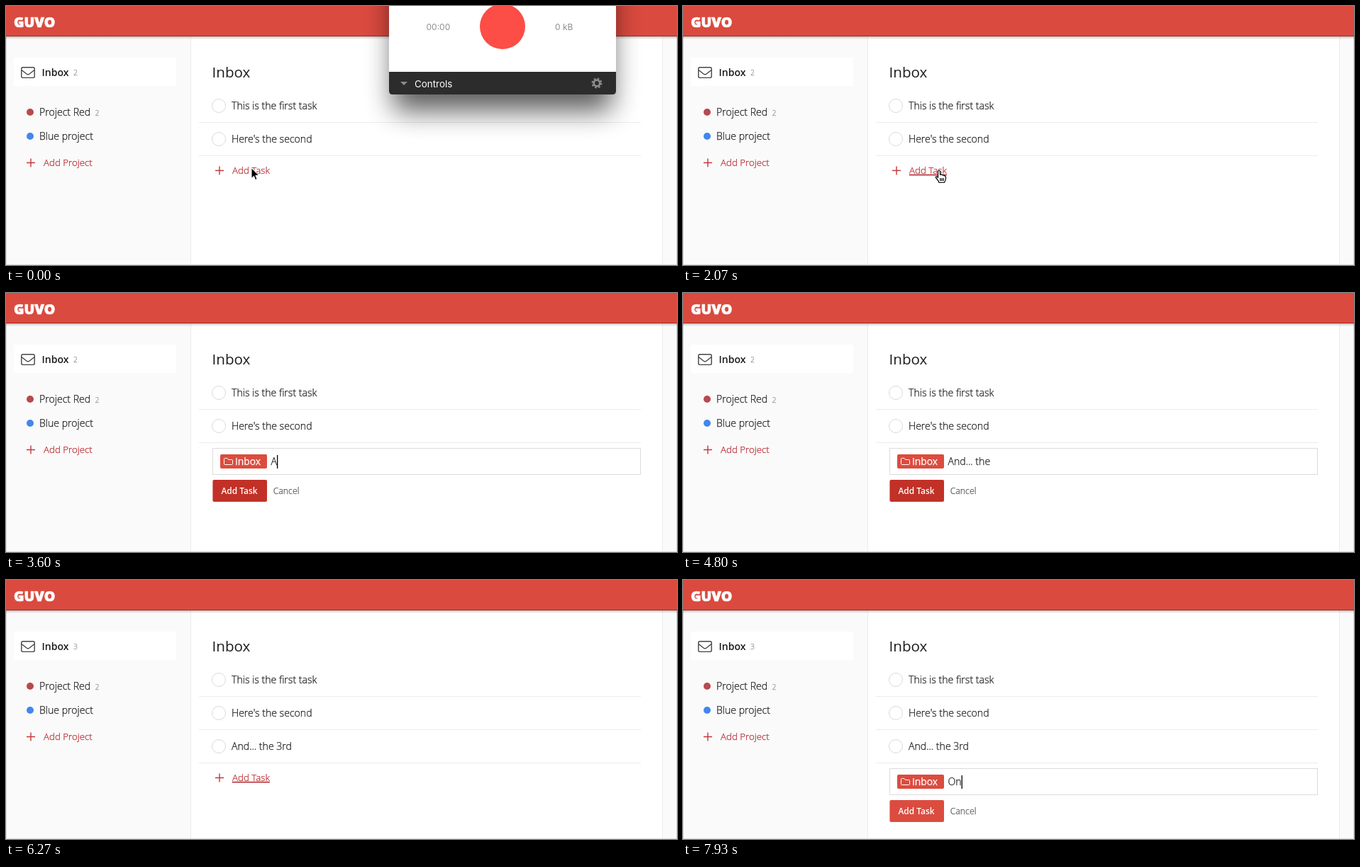
Animation of 946x366 px, one loop 8 s. Source, as an HTML page:

```html
<!DOCTYPE html>
<html lang="en">
<head>
<meta charset="utf-8">
<title>Task list</title>
<style>
  html, body { margin: 0; width: 100%; height: 100%; overflow: hidden; background: #fff; }
  svg { display: block; width: 946px; height: 366px; }
  text {
    font: 300 14.1px "Open Sans", sans-serif; white-space: pre;
    color: #1c1c1c; fill: currentColor; stroke: currentColor; stroke-width: .25;
  }
  .logo { font: 800 19.6px "Open Sans", sans-serif; color: #fff; stroke-width: .7; }
  .title { font-size: 20.6px; font-weight: 400; stroke-width: 0; }
  .strong { font-weight: 600; stroke-width: 0; }
  .count { font-size: 10.5px; color: #999; }
  .link { font-size: 13.3px; color: #b92e34; }
  .button { font-size: 11.9px; font-weight: 600; color: #fff; stroke-width: 0; }
  .cancel { font-size: 12.3px; color: #555; }
  .chip { font-size: 13.8px; font-weight: 400; color: #fff; }
  .meter { font: 400 12px Inter, sans-serif; color: #8e8e8e; stroke-width: 0; }
  .controls { font: 400 13.4px Inter, sans-serif; color: #fff; stroke-width: 0; }
  .line { fill: none; stroke: #ececec; }
  .plus { fill: none; stroke: #c5383a; stroke-width: 1.4; }
  .cursor { stroke-linejoin: round; stroke-linecap: round; }
</style>
</head>
<body>
<svg viewBox="0 0 946 366">
  <defs>
    <linearGradient id="drop" x2="0" y2="1">
      <stop stop-color="#000" stop-opacity=".22"/>
      <stop offset="1" stop-color="#000" stop-opacity="0"/>
    </linearGradient>
    <filter id="soft" x="-30%" y="-60%" width="160%" height="220%">
      <feGaussianBlur stdDeviation="19"/>
    </filter>
    <path id="plus" class="plus" d="M-6 0H6M0-6V6"/>
  </defs>

  <rect width="946" height="366" fill="#fafafa"/>
  <rect x="261" y="43" width="664" height="323" fill="#fff"/>
  <path class="line" d="M260.5 43V366M925.5 43V366"/>
  <path d="M.5 43V365.5H945.5V43" fill="none" stroke="#dedede"/>
  <rect width="946" height="42" fill="#da4a3f"/>
  <rect y="42" width="946" height="1" fill="#a52b22"/>
  <rect y="43" width="946" height="4" fill="url(#drop)"/>
  <text class="logo" x="11" y="30">GUVO</text>

  <rect x="11" y="73" width="229" height="40" fill="#fff"/>
  <g fill="none" stroke="#444" stroke-width="1.4">
    <rect x="21.8" y="86.8" width="18.4" height="14.6" rx="1.8"/>
    <path d="M22 90.5L29 96Q31 97.5 33 96L40 90.5"/>
  </g>
  <text class="strong" x="50.5" y="99">Inbox</text>
  <text class="count" x="95" y="98" id="count"></text>
  <circle cx="34" cy="150" r="5" fill="#b8494d"/>
  <text x="47" y="155">Project Red</text>
  <text class="count" x="125.5" y="155">2</text>
  <circle cx="34" cy="184" r="5" fill="#4386ee"/>
  <text x="47" y="189">Blue project</text>
  <use href="#plus" x="35" y="221.5"/>
  <text class="link" x="53" y="226">Add Project</text>

  <text class="title" x="290.5" y="101">Inbox</text>
  <g id="tasks"></g>

  <g id="addLink">
    <use href="#plus" x="301" y="232.5"/>
    <text class="link" x="319" y="237" id="addText">Add Task</text>
  </g>

  <g id="form">
    <rect x="291.5" y="219.5" width="603" height="37" fill="#fff" stroke="#dcdcdc"/>
    <rect x="302" y="228" width="66" height="20" rx="2" fill="#db4c3f"/>
    <path d="M307.5 241.5V234.5Q307.5 233.5 308.5 233.5H312L313.5 235.5H318.5Q319.5 235.5 319.5 236.5V241.5Q319.5 242.5 318.5 242.5H308.5Q307.5 242.5 307.5 241.5Z" fill="none" stroke="#fff"/>
    <text class="chip" x="323" y="243">Inbox</text>
    <text x="373.5" y="243" id="typed"></text>
    <rect y="229" width="1.3" height="19" fill="#000" id="caret"/>
    <rect x="291.4" y="264" width="76.6" height="31" rx="2" id="button"/>
    <text class="button" x="303.5" y="284">Add Task</text>
    <text class="cancel" x="376.7" y="284">Cancel</text>
  </g>

  <g id="recorder">
    <rect x="546" y="-40" width="308" height="188" rx="6" opacity=".64" filter="url(#soft)"/>
    <path d="M540 0H860V93H540Z" fill="#fff"/>
    <path d="M540 93H860V120Q860 125 855 125H545Q540 125 540 120Z" fill="#2c2c2c"/>
    <circle cx="700" cy="29" r="32" fill="#fc4d46"/>
    <text class="meter" x="592.5" y="34">00:00</text>
    <text class="meter" x="774" y="34">0 kB</text>
    <path d="M556 107H566L561 112Z" fill="#8c8c8c"/>
    <text class="controls" x="576" y="115">Controls</text>
    <g transform="translate(833 109)" fill="none" stroke="#8c8c8c">
      <circle r="4.3" stroke-width="2.8"/>
      <circle r="6.4" stroke-width="2.2" stroke-dasharray="2.5 2.53"/>
    </g>
  </g>

  <g class="cursor" id="cursor">
    <path id="arrow" d="M0 0V14.5L3.4 11.4 5.6 16.6 8 15.6 5.8 10.6H10.3Z" fill="#000" stroke="#fff"/>
    <g id="grab" fill="#fff" stroke="#000" stroke-width="1.2">
      <path d="M-4 8Q-5 4-8 1C-8.5-1.5-6-1.5-5 .5L-6.5-4.5C-6.5-6.5-4-6.5-3.5-4.5L-3-6C-3-8.5 0-8.5 0-6.5C0-8.5 3-8 3-5.5C4-7 6-6 5.8-4C7-5 8.5-4 8-2Q7.5 4 5 8Z"/>
      <path d="M-3.5-4.5L-2.5-1M0-6.5V-1.5M3-5.5L2.7-1M5.8-4L5-.5" fill="none"/>
    </g>
    <g id="pointer" fill="#fff" stroke="#000" stroke-width="1.2">
      <path d="M-1.5 1C-1.5-1 1.5-1 1.5 1V5.5Q4 4.5 4.5 6Q7 5.5 7 7Q9.5 6.5 9.5 9V11Q9 14 7.5 16.5H0Q-1 13.5-4.5 9.5C-5 7.5-3 7-1.5 9.5Z"/>
      <path d="M1.8 10.5V14M4 10.5V14M6.2 10.5V14" fill="none"/>
    </g>
  </g>
</svg>
<script>
const LOOP = 8000, ROW = 47;
const $ = id => document.getElementById(id);
const show = (id, on) => $(id).style.display = on ? "" : "none";
const clamp = v => Math.max(0, Math.min(1, v));

const tasks = ["This is the first task", "Here's the second", "And... the 3rd"];
$("tasks").innerHTML = tasks.map((name, i) => `
  <g transform="translate(0 ${i * ROW})">
    <circle cx="300" cy="141" r="9.5" fill="#fff" stroke="#dadada"/>
    <text x="318" y="146">${name}</text>
    <path class="line" d="M272 164.5H895"/>
  </g>`).join("");

// Each entry form: when it opens and closes, its text and the time of each key.
const forms = [
  { open: 2670, close: 5730, text: tasks[2],
    keys: [3530, 3670, 3730, 3800, 3870, 3930, 4000, 4070, 4130, 4200, 4930, 5070, 5200, 5330] },
  { open: 7130, close: LOOP, text: "On", keys: [7730, 7900] }
];

// Cursor stops: time, x, y
const stops = [[0, 346, 229], [200, 346, 232], [650, 346, 232], [850, 361, 233],
  [2250, 361, 233], [2550, 346, 275]];

function cursorAt(t) {
  const next = stops.findIndex(s => s[0] > t);
  if (next < 0) return stops.at(-1).slice(1);
  const [t0, x0, y0] = stops[next - 1], [t1, x1, y1] = stops[next];
  const u = clamp((t - t0) / (t1 - t0)), k = u * u * (3 - 2 * u);
  return [x0 + (x1 - x0) * k, y0 + (y1 - y0) * k];
}

function drawForm(form, t, hover) {
  const count = form.keys.filter(k => k <= t).length;
  const since = t - (count ? form.keys[count - 1] : form.open);
  $("typed").textContent = form.text.slice(0, count);
  $("caret").setAttribute("x", 373.5 + (count ? $("typed").getComputedTextLength() : 0));
  show("caret", since % 1000 < 500);
  $("button").setAttribute("fill", hover ? "#c23127" : "#db4c3f");
}

function draw(t) {
  const form = forms.find(f => t >= f.open && t < f.close);
  const added = t >= forms[0].close;
  const [x, y] = cursorAt(t);
  const offset = `translate(0 ${added ? ROW : 0})`;

  $("recorder").style.opacity = 1 - clamp((t - 70) / 140);
  $("count").textContent = added ? 3 : 2;
  $("tasks").lastElementChild.style.display = added ? "" : "none";

  show("addLink", !form);
  show("form", form);
  $("addLink").setAttribute("transform", offset);
  $("form").setAttribute("transform", offset);
  const linkHover = t > 750 && (added || y < 243);
  $("addText").setAttribute("text-decoration", linkHover ? "underline" : "none");
  if (form) drawForm(form, t, !added);

  show("cursor", t < 3530 || (t >= 6600 && t < 7130));
  $("cursor").setAttribute("transform", `translate(${x} ${y})`);
  show("arrow", t < 200);
  show("grab", t >= 200 && t < 750);
  show("pointer", t >= 750);
}

const start = performance.now();
function tick() {
  draw((performance.now() - start) % LOOP);
  requestAnimationFrame(tick);
}
tick();
</script>
</body>
</html>
```
